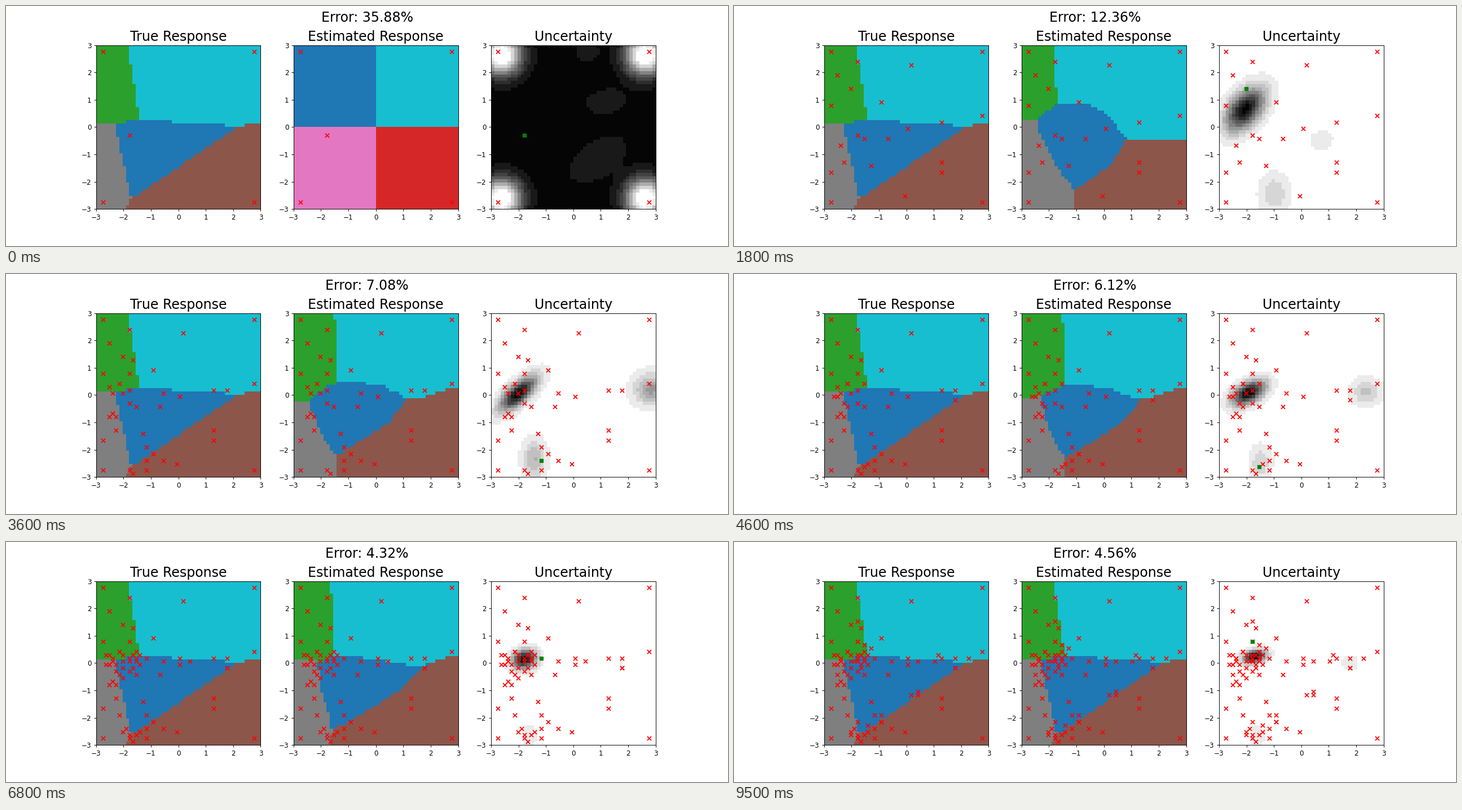
Write a matplotlib script that moves like this. It is 1280 px wide and 427 px high and loops after 9600 ms.

```python
from itertools import product

import numpy as np
import matplotlib.pyplot as plt
from matplotlib.animation import FuncAnimation

N, FRAMES = 50, 96
DPI = 256 / 3
LEVELS = 12
GREEN, CYAN, GRAY, BLUE, BROWN, PINK, RED = 2, 9, 7, 0, 5, 6, 3

cells = np.arange(N)
grid = np.linspace(-3, 3, N)
X, Y = np.meshgrid(grid, grid[::-1])


def blend(times, states, frame):
    """Linear mix of the two states around the frame."""
    i = min(np.searchsorted(times, frame, side="right"), len(times) - 1) - 1
    t = min(max((frame - times[i]) / (times[i + 1] - times[i]), 0), 1)
    return (1 - t) * states[i] + t * states[i + 1]


# ---- response maps: five regions split by four borders, in cell units ----
def borders(*lines):
    """Skyline over columns, then green, gray and brown edges over rows."""
    return np.array([np.interp(cells, *zip(*line)) for line in lines])


def regions(edges):
    sky, green, gray, brown = np.round(edges)
    c, r = cells[None, :], cells[:, None]
    upper = np.where(c < green[:, None], GREEN, CYAN)
    lower = np.where(c >= brown[:, None], BROWN,
                     np.where(c < gray[:, None], GRAY, BLUE))
    return np.where(r >= sky, lower, upper)


true_edges = borders([(0, 24), (8, 24), (9, 22.7), (44, 24.85), (45, 24)],
                     [(0, 9.53), (49, 17.59)],
                     [(24, 5.7), (49, 11.25)],
                     [(24, 45), (25, 42), (47, 10), (49, 9)])
true_map = regions(true_edges)

# The estimate starts as quadrants and settles on the true borders.
edge_times = (0, 8, 18, 36, 58, 95)
edge_states = [
    np.full((4, N), N / 2),
    borders([(0, 22), (6, 17), (10, 15), (17, 15), (24, 17), (30, 21),
             (35, 21), (41, 19)],
            [(0, 8.6), (14, 10.55)],
            [(23, 1), (35, 7), (43, 18)],
            [(24, 31), (33, 25.5), (43, 18)]),
    borders([(4, 23), (10, 18), (19, 18), (24, 20), (32, 29), (47, 29)],
            [(0, 9.6), (24, 11.4)],
            [(25, 5), (34, 9), (44, 16)],
            [(28, 32), (36, 27), (44, 16)]),
    borders([(4, 27), (7, 24), (13, 21), (17, 21), (26, 22), (34, 26),
             (38, 26), (47, 23)],
            [(0, 12), (3, 13)],
            [(28, 5), (38, 9), (43, 13)],
            [(26, 34), (33, 29), (43, 13)]),
    borders([(2, 24), (8, 25), (12, 23), (18, 23), (34, 26), (39, 26),
             (48, 22)],
            [(0, 12), (49, 12)],
            [(31, 8), (43, 12)],
            [(25, 40), (34, 31), (43, 16), (44, 12)]),
    true_edges]


def estimate(frame):
    labels = regions(blend(edge_times, edge_states, frame))
    if frame < 2:
        for old, new in ((GREEN, BLUE), (GRAY, PINK), (BROWN, RED)):
            labels[labels == old] = new
    return labels


# ---- uncertainty: drifting, shrinking Gaussian blobs ----
def blob(x, y, sx, sy, angle, amp):
    a = np.radians(angle)
    u = (X - x) * np.cos(a) + (Y - y) * np.sin(a)
    v = (Y - y) * np.cos(a) - (X - x) * np.sin(a)
    return amp * np.exp(-(u / sx) ** 2 / 2 - (v / sy) ** 2 / 2)


def track(*keys):
    """Keys are (frame, x, y, sx, sy, angle, amp)."""
    return [k[0] for k in keys], [np.array(k[1:]) for k in keys]


tracks = [
    track((8, -2.1, 1.05, 1.05, .5, 4, .85), (18, -2.1, .65, .64, .38, 50, 1),
          (36, -2.05, .05, .6, .25, 42, 1), (58, -1.85, .1, .32, .27, 15, 1),
          (95, -1.75, .23, .3, .17, 15, 1)),
    track((8, -.9, -2.4, .36, .9, 0, .3), (18, -1, -2.5, .37, .5, 0, .2),
          (36, -1.45, -2.4, .3, .5, 0, .3), (58, -1.6, -2.7, .25, .35, 0, .08)),
    track((8, .4, .5, .6, .42, -45, .6), (18, .75, -.5, .35, .3, 30, .09),
          (36, 2.9, .2, .45, .4, 0, .4), (58, 1.8, 0, .3, .25, 0, .03),
          (95, 1.8, 0, .3, .25, 0, .08))]

haze = blob(-1.8, -.3, 1.4, 2.2, 0, .24) + blob(1.8, 1.1, 1.3, .6, 0, .2)
start = 1 - sum(blob(x, y, .5, .5, 0, 1.2)
                for x, y in product((-2.67, 2.67), repeat=2))
start -= (blob(1.2, .95, .6, .37, 10, .085) + blob(.9, -1.2, .9, .5, 35, .1)
          + blob(.5, 2.8, .4, .35, 0, .075))


def darkness(frame):
    dark = sum(blob(*blend(*tr, frame)) for tr in tracks)
    dark += haze * np.clip((18 - frame) / 10, 0, 1)
    t = min(frame / 8, 1)
    return np.clip((1 - t) * start + t * dark, 0, 1)


# ---- samples (column, row from below): a wide scan, then where unsure ----
scan = [(2, 47), (47, 47), (2, 2), (47, 2), (10, 22), (35, 14), (26, 43),
        (4, 40), (19, 21), (5, 19), (35, 11), (10, 44), (35, 26), (24, 4),
        (2, 11), (17, 32), (25, 24), (2, 31), (14, 13), (47, 28), (6, 14),
        (12, 21), (8, 36)]
points = [(grid[c], grid[r]) for c, r in scan]

padded = np.pad(true_map, 2, mode="edge")
near_border = np.any([padded[i:i + N, j:j + N] != true_map
                      for i, j in product((0, 2, 4), repeat=2)], axis=0)
rng = np.random.default_rng(4)
for frame in range(len(points) - 5, FRAMES - 1):
    weight = (darkness(frame) + .05 * near_border).ravel()
    pick = rng.choice(N * N, p=weight / weight.sum())
    points.append((X.flat[pick], Y.flat[pick]))
points = np.array(points)

# ---- figure ----
fig, axes = plt.subplots(1, 3, figsize=(1280.001 / DPI, 427.001 / DPI), dpi=DPI)
fig.subplots_adjust(left=.1247, right=.8998, bottom=.1104, top=.8804)
heading = fig.suptitle("", fontsize=20)
titles = ("True Response", "Estimated Response", "Uncertainty")
box = dict(extent=(-3, 3, -3, 3), interpolation="nearest")
classes = dict(cmap="tab10", vmin=0, vmax=9, **box)

images = [axes[0].imshow(true_map, **classes),
          axes[1].imshow(true_map, **classes),
          axes[2].imshow(start, cmap="gray", vmin=-.02, vmax=1, **box)]
crosses = [ax.scatter([], [], marker="x", color="red") for ax in axes]
newest = axes[2].scatter([], [], s=25, marker="s", color="green")

for ax, title in zip(axes, titles):
    ax.set_title(title, fontsize=20)
    ax.set(xlim=(-3, 3), ylim=(-3, 3), xticks=range(-3, 4), yticks=range(-3, 4))


def error(frame):
    """Percentage of wrong cells, in whole cells."""
    value = np.interp(frame, (0, 8, 18, 36, 58, 78, 95),
                      (35.88, 20.2, 12.36, 7.08, 5, 3.64, 4.56))
    return round(value * N * N / 100) * 100 / N ** 2


def update(frame):
    count = frame + 5
    images[1].set_data(estimate(frame))
    images[2].set_data(1 - np.round(darkness(frame) * LEVELS) / LEVELS)
    for cross, n in zip(crosses, (count, count, count - 1)):
        cross.set_offsets(points[:n])
    newest.set_offsets(points[count - 1:count])
    heading.set_text(f"Error: {error(frame):.2f}%")
    return [*images, *crosses, newest, heading]


anim = FuncAnimation(fig, update, frames=FRAMES, interval=100,
                     init_func=lambda: update(0), repeat=True, repeat_delay=0)
plt.show()
```
